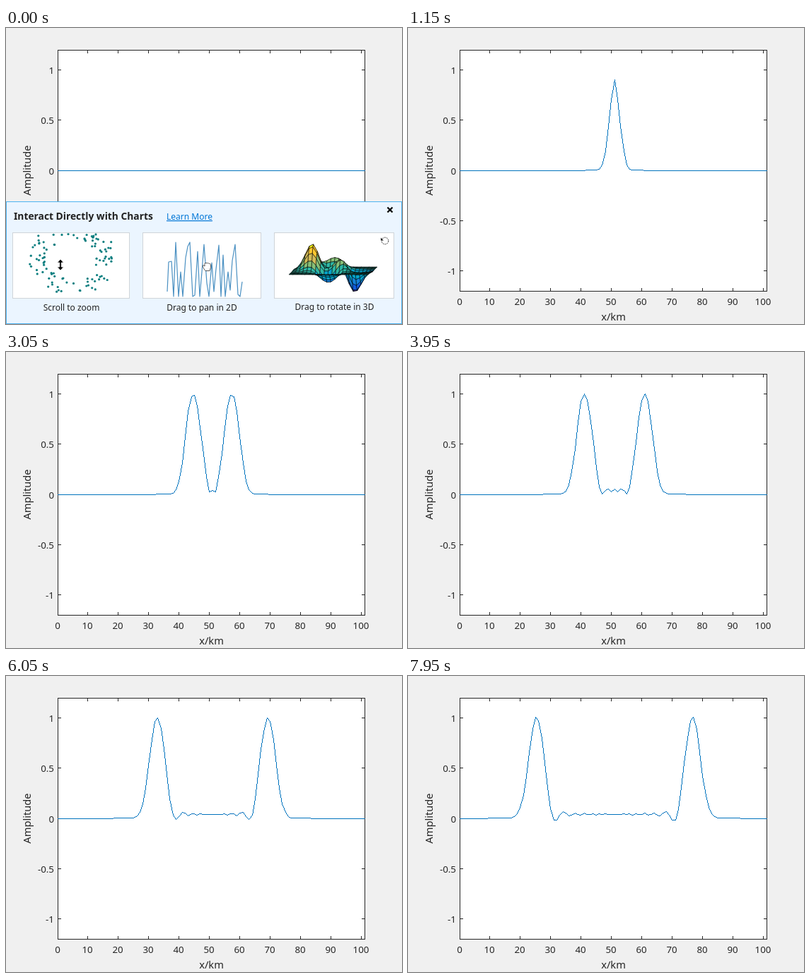
These frames come from a looping animation (560 by 420 pixels, 8000 ms). An HTML page:

```html
<!DOCTYPE html>
<html lang="en">
<head>
<meta charset="utf-8">
<title>Wave on a string</title>
<style>
  html, body { margin: 0; width: 100%; height: 100%; overflow: hidden; background: #f0f0f0; }
  svg { display: block; width: 560px; height: 420px; font-family: "Noto Sans", "Open Sans", sans-serif; }
  .crisp { shape-rendering: crispEdges; }
  .ticks text { font-size: 13.33px; fill: #262626; }
  .label { font-size: 14.67px; fill: #262626; text-anchor: middle; }
  .caption { font-size: 12px; fill: #212121; text-anchor: middle; }
</style>
</head>
<body>
<svg viewBox="0 0 560 420">
  <rect width="560" height="420" fill="#f0f0f0"/>
  <rect class="crisp" x="73" y="31" width="435" height="343" fill="#fff"/>
  <path id="axes" class="crisp" fill="none" stroke="#262626"/>
  <g id="ticks" class="ticks"></g>
  <text class="label" x="290.5" y="415">x/km</text>
  <text class="label" transform="translate(35 202) rotate(-90)">Amplitude</text>
  <path id="curve" class="crisp" fill="none" stroke="#0072bd"/>

  <g id="banner">
    <rect x=".5" y="246.5" width="559" height="173" fill="#ebf5ff" stroke="#4db3f0"/>
    <text x="11" y="272" font-size="13.8" font-weight="700" fill="#212121">Interact Directly with Charts</text>
    <text x="227" y="272" font-size="12" fill="#0076d6" text-decoration="underline">Learn More</text>
    <path d="M539.5 254.5l7 7m0-7l-7 7" stroke="#000" stroke-width="2.2"/>
    <g fill="#fff" stroke="#cfd4d8">
      <rect x="9.5" y="290.5" width="165" height="93"/>
      <rect x="193.5" y="290.5" width="167" height="93"/>
      <rect x="379.5" y="290.5" width="169" height="93"/>
    </g>
    <g id="dots" fill="#0d7f80"></g>
    <path d="M77 328l4.5 5h-3.2v6h3.2l-4.5 5-4.5-5h3.2v-6h-3.2z" fill="#000" stroke="#fff" stroke-width=".8"/>
    <polyline fill="none" stroke="#4a90c2" stroke-width="1.2" stroke-linejoin="round" points="228,374 230,332 234,331 237,381 240,304 244,381 247,346 250,381 254,326 257,310 260,304 264,381 267,379 271,317 274,381 277,346 280,307 284,362 287,381 291,333 294,374 297,342 301,308 304,381 307,322 310,381 314,346 317,372 320,330 324,307 328,378 331,381 334,360"/>
    <path d="M280 342l-2-4q0-2 2-1l1 1v-4q1-2 2 0q1-2 2.500 0q1-1 2 .5q1.500-.5 2 1v4l-1.500 5h-6z" fill="#fff" stroke="#333" stroke-width=".8"/>
    <g id="surface" stroke="#000" stroke-width=".55" stroke-linejoin="round"></g>
    <circle cx="536" cy="302" r="4.800" fill="none" stroke="#222" stroke-dasharray="1.800 1.200"/>
    <path d="M530 297.500v4h4z" fill="#222"/>
    <text class="caption" x="92.500" y="401">Scroll to zoom</text>
    <text class="caption" x="277" y="401">Drag to pan in 2D</text>
    <text class="caption" x="464.500" y="400">Drag to rotate in 3D</text>
  </g>
</svg>
<script>
const byId = id => document.getElementById(id);
const LAST = 80, CELLS = 101, SOURCE = 51, COURANT2 = 0.16, PULSE = 30;
const LEFT = 73, RIGHT = 507, TOP = 31, BOTTOM = 373;

// The small offset keeps vanishingly small values on the zero row.
const px = x => Math.floor(LEFT + x * (RIGHT - LEFT) / CELLS);
const py = u => Math.floor(202.00001 - u * 142.5);

function drawAxes() {
  let d = `M73.5 31.5H507.5V373.5H73.5Z`, labels = '';
  for (let x = 0; x <= 100; x += 10) {
    const c = px(x) + 0.5;
    d += `M${c} ${TOP}v5M${c} ${BOTTOM + 1}v-5`;
    labels += `<text x="${c - 0.5}" y="393" text-anchor="middle">${x}</text>`;
  }
  for (let v = -1; v <= 1; v += 0.5) {
    const r = py(v);
    d += `M${LEFT} ${r + 0.5}h5M${RIGHT + 1} ${r + 0.5}h-5`;
    labels += `<text x="68" y="${r + 6}" text-anchor="end">${v}</text>`;
  }
  byId('axes').setAttribute('d', d);
  byId('ticks').innerHTML = labels;
}

// Explicit second-order wave equation, driven at one node by a sin² pulse.
function simulate() {
  let prev = new Float64Array(CELLS + 1), cur = prev.slice();
  const states = [cur];
  for (let n = 1; n <= LAST; n++) {
    const next = new Float64Array(CELLS + 1);
    for (let i = 1; i < CELLS; i++) {
      next[i] = 2 * cur[i] - prev[i] + COURANT2 * (cur[i + 1] - 2 * cur[i] + cur[i - 1]);
    }
    if (n < PULSE) next[SOURCE] = Math.sin(Math.PI * n / PULSE) ** 2;
    states.push(next);
    prev = cur;
    cur = next;
  }
  return states;
}

// One-pixel line without antialiasing.
function segment(xa, ya, xb, yb) {
  const dx = xb - xa, dy = yb - ya, steps = Math.max(dx, Math.abs(dy));
  let d = '';
  for (let i = 0; i <= steps; i++) {
    const x = xa + Math.floor(0.5 + dx * i / steps);
    const y = ya + Math.sign(dy) * Math.floor(0.5 + Math.abs(dy) * i / steps);
    d += `M${x} ${y + 0.5}h1`;
  }
  return d;
}

function curvePath(u) {
  let d = '';
  for (let i = 0; i < CELLS; i++) d += segment(px(i), py(u[i]), px(i + 1), py(u[i + 1]));
  return d;
}

function drawDots() {
  let seed = 11, out = '';
  const rand = () => (seed = seed * 16807 % 2147483647) / 2147483647;
  for (let i = 0; i < 110; i++) {
    const a = rand() * 2 * Math.PI, r = 0.55 + 0.45 * rand();
    const x = 94 + 61 * r * Math.cos(a), y = 327 + 53 * r * Math.sin(a);
    if (y > 292 && y < 382) out += `<circle cx="${x.toFixed(1)}" cy="${y.toFixed(1)}" r="1.6"/>`;
  }
  byId('dots').innerHTML = out;
}

const peaks = (x, y) =>
  3 * (1 - x) ** 2 * Math.exp(-x * x - (y + 1) ** 2)
  - 10 * (x / 5 - x ** 3 - y ** 5) * Math.exp(-x * x - y * y)
  - Math.exp(-((x + 1) ** 2) - y * y) / 3;

function drawSurface() {
  const ramp = ['#352a87', '#0f5cdd', '#1481d6', '#06a4ca', '#2eb7a4', '#87bf77', '#d1bb59', '#fec832', '#f9fb0e'];
  const N = 20, at = i => -3 + 6 * i / N;
  const project = (i, j) => {
    const x = 400 + 112 * (1 - j / N) + 13 * i / N;
    const y = 350 - 11 * i / N - 4.7 * peaks(at(i), at(j));
    return `${x.toFixed(1)},${y.toFixed(1)}`;
  };
  let out = '';
  for (let i = N - 1; i >= 0; i--) {
    for (let j = 0; j < N; j++) {
      const z = peaks(at(i + 0.5), at(j + 0.5));
      const k = Math.max(0, Math.min(8, Math.round((z + 6.5) / 14.6 * 8)));
      const corners = [project(i, j), project(i + 1, j), project(i + 1, j + 1), project(i, j + 1)];
      out += `<polygon points="${corners.join(' ')}" fill="${ramp[k]}"/>`;
    }
  }
  byId('surface').innerHTML = out;
}

drawAxes();
drawDots();
drawSurface();
const states = simulate();
let shown = -1;

function render(ms) {
  const n = Math.min(LAST, Math.floor((ms % 8000 + 50) / 100));
  if (n === shown) return;
  shown = n;
  byId('curve').setAttribute('d', curvePath(states[n]));
  byId('banner').style.display = n === 0 ? '' : 'none';
}

const start = performance.now();
function tick() {
  render(performance.now() - start);
  requestAnimationFrame(tick);
}
tick();
</script>
</body>
</html>
```
